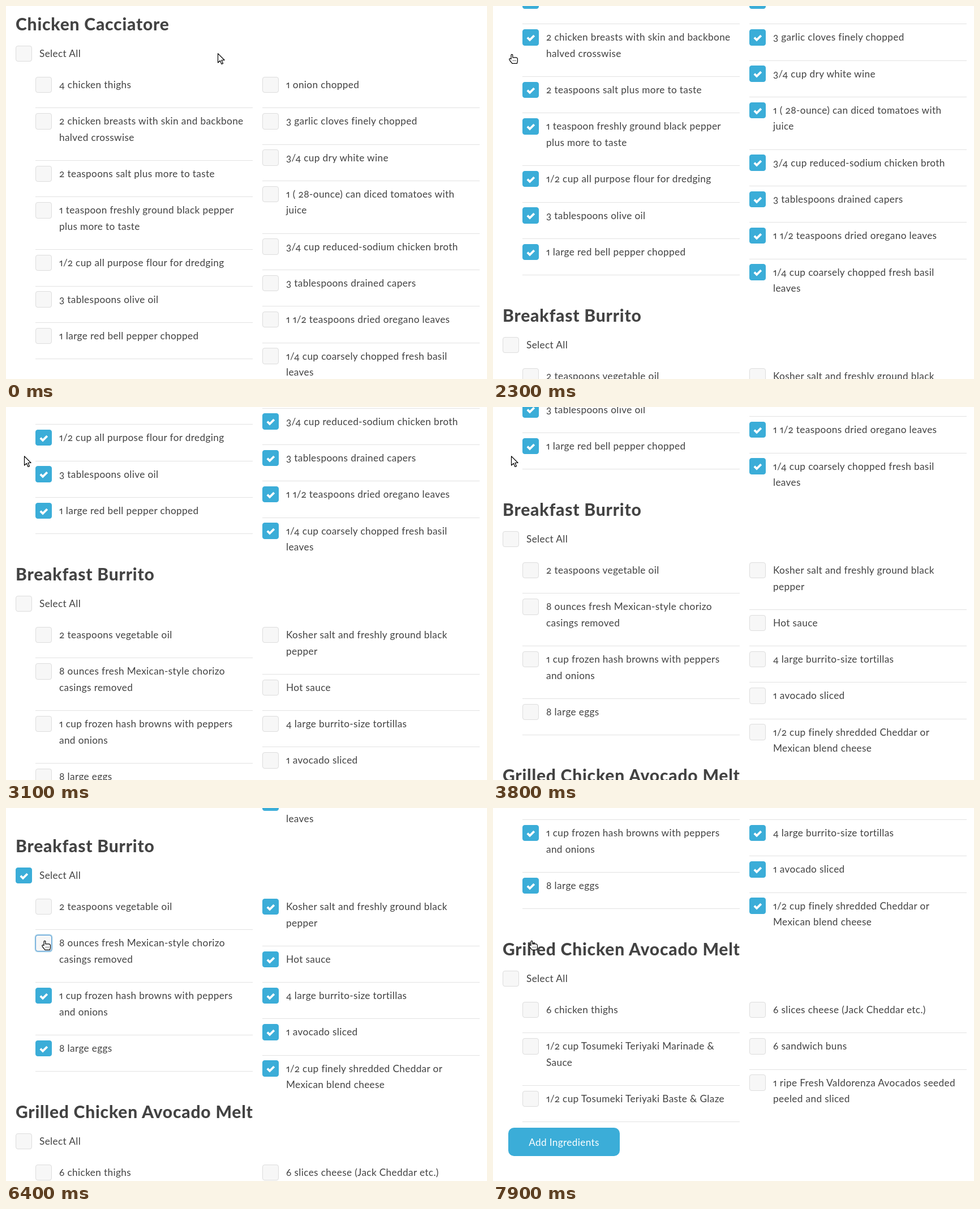
An HTML page for the animation above (8000 ms loop, 850 by 658 pixels).

```html
<!DOCTYPE html>
<html lang="en">
<head>
<meta charset="utf-8">
<title>Ingredient checklist</title>
<style>
html, body { margin: 0; width: 100%; height: 100%; overflow: hidden; background: #fff; }
#stage { position: relative; width: 850px; height: 658px; overflow: hidden; }
#page {
  position: absolute; inset: 0; color: #424242;
  font: 17.2px/28.56px Lato, "Open Sans", sans-serif;
  font-variant-numeric: oldstyle-nums proportional-nums;
  letter-spacing: .37px; white-space: pre;
}
section { position: absolute; left: 0; width: 850px; }
h1 {
  position: absolute; left: 17px; top: 13.4px; margin: 0; color: #434343;
  font: 800 30px/36px Lato, "Open Sans", sans-serif; letter-spacing: .8px;
}
.all { position: absolute; left: 17px; top: 70px; }
.column { position: absolute; top: 116.08px; width: 384px; }
.item { padding: 8.92px 0 25.82px; border-bottom: 1px solid #e2e2e2; }
.right .item:last-child { border: 0; }
.row { position: relative; padding-left: 42px; }
.box {
  position: absolute; left: 0; top: -.3px; width: 29px; height: 28.56px; box-sizing: border-box;
  background: #f7f7f7; border: 1px solid #ddd; border-radius: 4px;
}
.box svg { position: absolute; left: -1px; top: -1px; visibility: hidden; }
.on { background: #3badd8; border-color: #3badd8; }
.on svg { visibility: visible; }
.focus { border-color: #5b9dd9; box-shadow: 0 0 2px .5px rgba(30, 140, 190, .8); }
#button {
  position: absolute; left: 27px; top: 1478px; width: 197px; height: 50px;
  border-radius: 10px; background: #3badd8; color: #fff; text-align: center; line-height: 51px;
}
#cursor { position: absolute; left: 0; top: 0; overflow: visible; }
#cursor path { fill: #fff; stroke: #000; stroke-width: 1.2; stroke-linejoin: round; }
</style>
</head>
<body>
<div id="stage">
  <div id="page"></div>
  <svg id="cursor" width="20" height="22">
    <path id="arrow" d="M.5 .8V17l3.8-3.5 2.7 6 2.5-1.1-2.6-5.9h5.2z"/>
    <g id="hand" transform="translate(-5 -.5)">
      <path d="M4 9V2.2a1.4 1.4 0 0 1 2.8 0V6.3h5.8a2.8 2.8 0 0 1 2.8 2.8V13l-1 3.8H6L2 12 .8 9.8A1.3 1.3 0 0 1 2.8 8.4z"/>
      <path d="M7.5 11.5v1m2.3-1v1m2.3-1v1"/>
    </g>
  </svg>
</div>
<script>
const LOOP = 8000, STEP = 100;

const recipes = [
  { title: "Chicken Cacciatore", top: 0,
    left: ["4 chicken thighs", "2 chicken breasts with skin and backbone\nhalved crosswise",
      "2 teaspoons salt plus more to taste", "1 teaspoon freshly ground black pepper\nplus more to taste",
      "1/2 cup all purpose flour for dredging", "3 tablespoons olive oil", "1 large red bell pepper chopped"],
    right: ["1 onion chopped", "3 garlic cloves finely chopped", "3/4 cup dry white wine",
      "1 ( 28-ounce) can diced tomatoes with\njuice", "3/4 cup reduced-sodium chicken broth",
      "3 tablespoons drained capers", "1 1/2 teaspoons dried oregano leaves",
      "1/4 cup coarsely chopped fresh basil\nleaves"] },
  { title: "Breakfast Burrito", top: 662,
    left: ["2 teaspoons vegetable oil", "8 ounces fresh Mexican-style chorizo\ncasings removed",
      "1 cup frozen hash browns with peppers\nand onions", "8 large eggs"],
    right: ["Kosher salt and freshly ground black\npepper", "Hot sauce", "4 large burrito-size tortillas",
      "1 avocado sliced", "1/2 cup finely shredded Cheddar or\nMexican blend cheese"] },
  { title: "Grilled Chicken Avocado Melt", top: 1131,
    left: ["6 chicken thighs", "1/2 cup Tosumeki Teriyaki Marinade &\nSauce",
      "1/2 cup Tosumeki Teriyaki Baste & Glaze"],
    right: ["6 slices cheese (Jack Cheddar etc.)", "6 sandwich buns",
      "1 ripe Fresh Valdorenza Avocados seeded\npeeled and sliced"] }
];

const page = document.getElementById("page");
const cursor = document.getElementById("cursor");
const arrow = document.getElementById("arrow");
const hand = document.getElementById("hand");

function add(parent, tag, className = "", text = "") {
  const el = document.createElement(tag);
  el.className = className;
  el.textContent = text;
  return parent.appendChild(el);
}

function addRow(parent, text, className = "") {
  const row = add(parent, "div", "row " + className, text);
  const box = add(row, "span", "box");
  box.innerHTML = '<svg width="29" height="29"><path d="M8.8 14.7 13 18.9 20.8 11.1" fill="none" stroke="#fff" stroke-width="3.8"/></svg>';
  return box;
}

// Each list of boxes starts with its "Select All" box.
const boxes = recipes.map(recipe => {
  const section = add(page, "section");
  section.style.top = recipe.top + "px";
  add(section, "h1", "", recipe.title);
  const list = [addRow(section, "Select All", "all")];
  for (const [side, x] of [["left", 52], ["right", 453]]) {
    const column = add(section, "div", "column " + side);
    column.style.left = x + "px";
    for (const text of recipe[side]) list.push(addRow(add(column, "div", "item"), text));
  }
  return list;
});
add(page, "div", "", "Add Ingredients").id = "button";

const clicks = [
  { at: 1400, recipe: 0, box: 0 },
  { at: 5000, recipe: 1, box: 0 },
  { at: 5800, recipe: 1, box: 1 },
  { at: 6400, recipe: 1, box: 2 }
];
const scrollKeys = [[0, 0], [1800, 0], [2300, 148], [3100, 399], [3300, 399], [4300, 627], [6900, 627], [7900, 914]];
const cursorKeys = [
  [0, 374, 83], [500, 190, 86], [900, 44, 86], [1100, 33, 85], [2700, 33, 85], [2800, 32, 86],
  [4300, 32, 86], [4400, 28, 102], [4700, 29, 112], [5000, 29, 112], [5700, 65, 172], [5800, 65, 172],
  [6200, 68, 234], [LOOP, 68, 234]
];
const handTimes = [[900, 2800], [4500, 5300], [5600, 6000], [6100, LOOP]];

function sample(keys, t) {
  const i = keys.findIndex(key => key[0] > t);
  if (i < 0) return keys[keys.length - 1].slice(1);
  const [from, to] = [keys[i - 1], keys[i]];
  const k = (t - from[0]) / (to[0] - from[0]);
  return from.slice(1).map((v, j) => v + (to[j + 1] - v) * k);
}

function render(t) {
  const [scroll] = sample(scrollKeys, t);
  page.style.transform = `translateY(${-Math.round(scroll)}px)`;

  boxes.flat().forEach(box => box.classList.remove("on", "focus"));
  let focused;
  for (const { at, recipe, box } of clicks) {
    if (at > t) break;
    focused = boxes[recipe][box];
    if (box === 0) boxes[recipe].forEach(b => b.classList.add("on"));
    else focused.classList.remove("on");
  }
  if (focused) focused.classList.add("focus");

  const [x, y] = sample(cursorKeys, t).map(Math.round);
  const pointing = handTimes.some(([start, end]) => t >= start && t < end);
  cursor.style.transform = `translate(${x}px, ${y}px)`;
  arrow.style.display = pointing ? "none" : "";
  hand.style.display = pointing ? "" : "none";
}

const start = performance.now();
function frame() {
  const t = (performance.now() - start) % LOOP;
  render(Math.floor(t / STEP) * STEP);
  requestAnimationFrame(frame);
}
frame();
</script>
</body>
</html>
```
